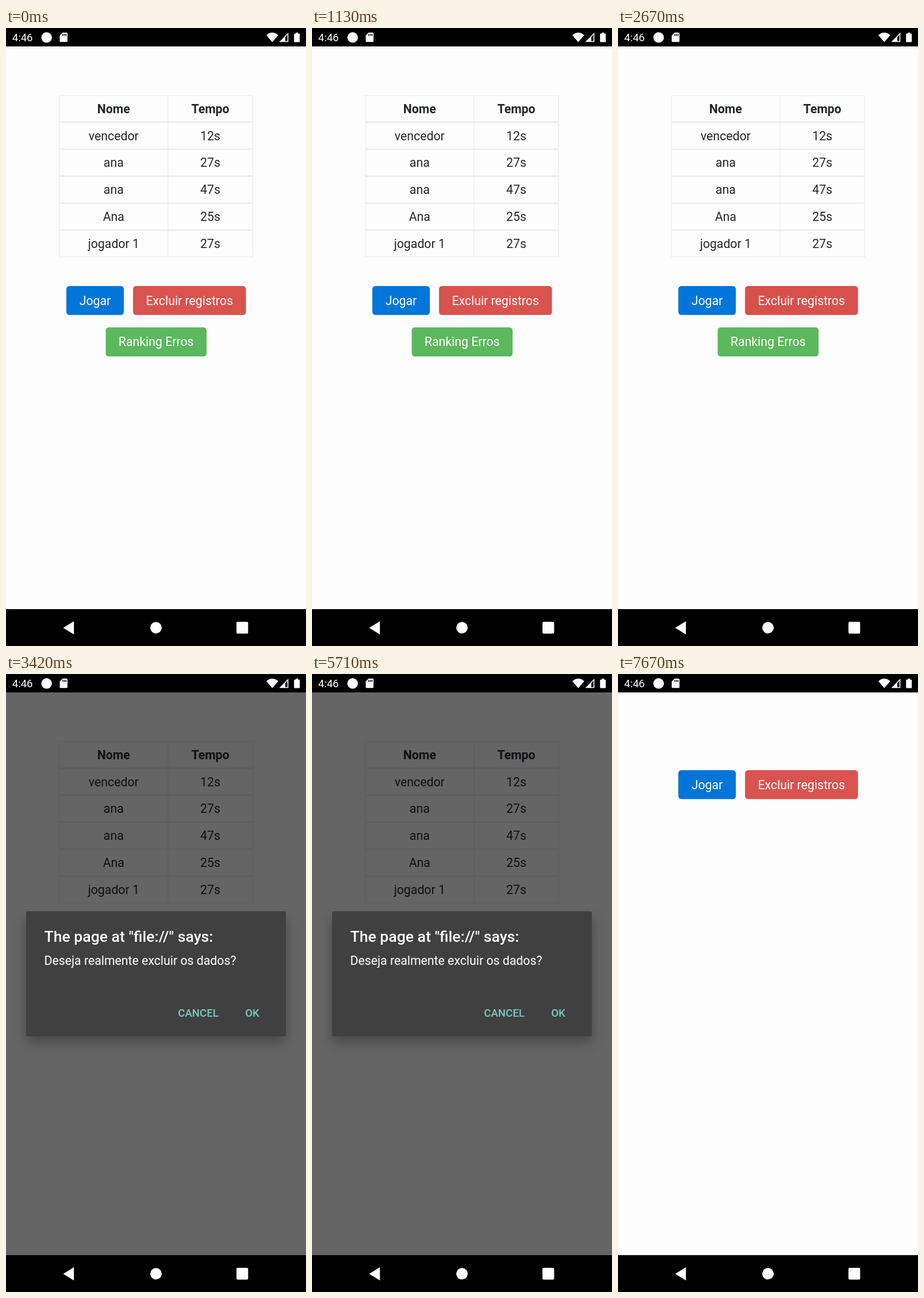
Write an HTML page that moves like this. It is 522 by 1073 pixels and loops after 7830 ms.

```html
<!DOCTYPE html>
<html lang="pt">
<head>
<meta charset="utf-8">
<title>Ranking</title>
<style>
  html, body { margin: 0; width: 100%; height: 100%; overflow: hidden; background: #fdfdfd; }
  svg { display: block; width: 100%; height: 100%; }
  text { font: 21.27px Roboto, sans-serif; }
  .mid { text-anchor: middle; }
  #table text { fill: #24272a; }
  #table .head { font-weight: 700; }
  .label { fill: #fff; }
  .title { font-size: 26.58px; font-weight: 500; }
  .action { font-size: 18.61px; font-weight: 500; fill: #7bcbc4; }
  .clock { font-size: 18.61px; }
</style>
</head>
<body>
<svg viewBox="0 0 522 1073">
  <defs>
    <filter id="shadow" x="-20%" y="-30%" width="140%" height="170%">
      <feDropShadow dx="0" dy="11" stdDeviation="11" flood-color="#000" flood-opacity=".3"/>
    </filter>
  </defs>
  <rect width="522" height="1073" fill="#fdfdfd"/>
  <g id="table"></g>
  <g id="buttons">
    <rect x="105" y="448" width="100" height="50.3" rx="5.3" fill="#0275d8"/>
    <text class="label mid" x="155" y="480.6">Jogar</text>
    <rect id="ring" x="218.3" y="445.3" width="201.9" height="55.7" rx="7.5" fill="#d9534f"/>
    <rect id="erase" x="221" y="448" width="196.5" height="50.3" rx="5.3"/>
    <text class="label mid" x="319.2" y="480.6">Excluir registros</text>
  </g>
  <g id="errors">
    <rect x="173.5" y="519.7" width="175.5" height="50.5" rx="5.3" fill="#5cb85c"/>
    <text class="label mid" x="261.2" y="552.3">Ranking Erros</text>
  </g>
  <rect id="dim" width="522" height="1073"/>
  <g id="dialog" fill="#fff">
    <rect x="35" y="412" width="452" height="217" rx="2.6" fill="#414141" filter="url(#shadow)"/>
    <text class="title" x="66.5" y="464.6">The page at "file://" says:</text>
    <text x="66.5" y="505.3">Deseja realmente excluir os dados?</text>
    <text class="action mid" x="334.5" y="595.2">CANCEL</text>
    <text class="action mid" x="428.5" y="595.2">OK</text>
  </g>
  <rect width="522" height="32"/>
  <rect y="1009" width="522" height="64"/>
  <g fill="#fdfdfd">
    <text class="clock" x="10.7" y="23.3">4:46</text>
    <circle cx="70.7" cy="16.4" r="9.2"/>
    <path d="M98.5 8H105.5Q107 8 107 9.5V22.8Q107 24.3 105.5 24.3H95Q93.5 24.3 93.5 22.8V13Z"/>
    <path d="M98.8 10.3v3.4M101.6 10.3v3.4M104.4 10.3v3.4" stroke="#000" stroke-width="1.5"/>
    <path d="M453 12.4Q463.3 3.8 473.7 12.4L463.3 24.5Z"/>
    <path d="M475.5 24.3L491.3 8V24.3Z"/>
    <path d="M486 15.5L489.7 11.8V22.7H486Z" fill="#000"/>
    <path d="M504.2 8H508.2V9.8H510.2Q511.2 9.8 511.2 10.8V23.5Q511.2 24.5 510.2 24.5H502.2Q501.2 24.5 501.2 23.5V10.8Q501.2 9.8 502.2 9.8H504.2Z"/>
    <path d="M118.2 1030V1053L99.5 1041.5Z"/>
    <circle cx="261" cy="1041.3" r="10"/>
    <rect x="401" y="1031" width="20.3" height="20.5" rx="2"/>
  </g>
</svg>
<script>
const $ = id => document.getElementById(id);
const LOOP = 7830, OPEN = 2760, CLOSE = 5790, CLEARED = 6110;

const rows = [['Nome', 'Tempo'], ['vencedor', '12s'], ['ana', '27s'],
  ['ana', '47s'], ['Ana', '25s'], ['jogador 1', '27s']];
const rowStep = 46.85;
const hLine = (y, w) => `<path d="M92.5 ${y}H429.8" stroke="#ebedee" stroke-width="${w}"/>`;
const vLine = x => `<path d="M${x} 117V397.8" stroke="#ebedee" stroke-width="1.2"/>`;

$('table').innerHTML = rows.map(([name, time], i) => {
  const y = 147.7 + i * rowStep, kind = i ? 'mid' : 'mid head';
  return hLine(117.4 + i * rowStep - (i ? .7 : 0), i ? 2.4 : 1.2) +
    `<text class="${kind}" x="187.3" y="${y}">${name}</text>` +
    `<text class="${kind}" x="355.5" y="${y}">${time}</text>`;
}).join('') + hLine(397.4, 1.2) + [93, 281.8, 429.4].map(vLine).join('');

const clamp = v => Math.min(1, Math.max(0, v));
const ramp = (t, start, length) => clamp((t - start) / length);
const mix = (a, b, k) => `rgb(${a.map((v, i) => Math.round(v + (b[i] - v) * k))})`;

function draw(t) {
  const cleared = t >= CLEARED;
  const shown = ramp(t, OPEN, 150) * (1 - ramp(t, CLOSE, 110));
  const scale = 1 - .1 * (1 - ramp(t, OPEN, 220)) ** 5;
  const focus = cleared ? 0 : ramp(t, OPEN - 100, 150);

  $('table').style.display = $('errors').style.display = cleared ? 'none' : '';
  $('buttons').setAttribute('transform', `translate(0 ${cleared ? -281 : 0})`);
  $('ring').setAttribute('opacity', focus * .5);
  $('erase').setAttribute('fill', mix([217, 83, 79], [200, 46, 43], focus));
  $('dim').setAttribute('opacity', shown * .6);
  $('dialog').setAttribute('opacity', shown);
  $('dialog').setAttribute('transform',
    `translate(261 520.5) scale(${scale}) translate(-261 -520.5)`);
}

const begin = performance.now();
function tick() {
  draw((performance.now() - begin) % LOOP);
  requestAnimationFrame(tick);
}
tick();
</script>
</body>
</html>
```
